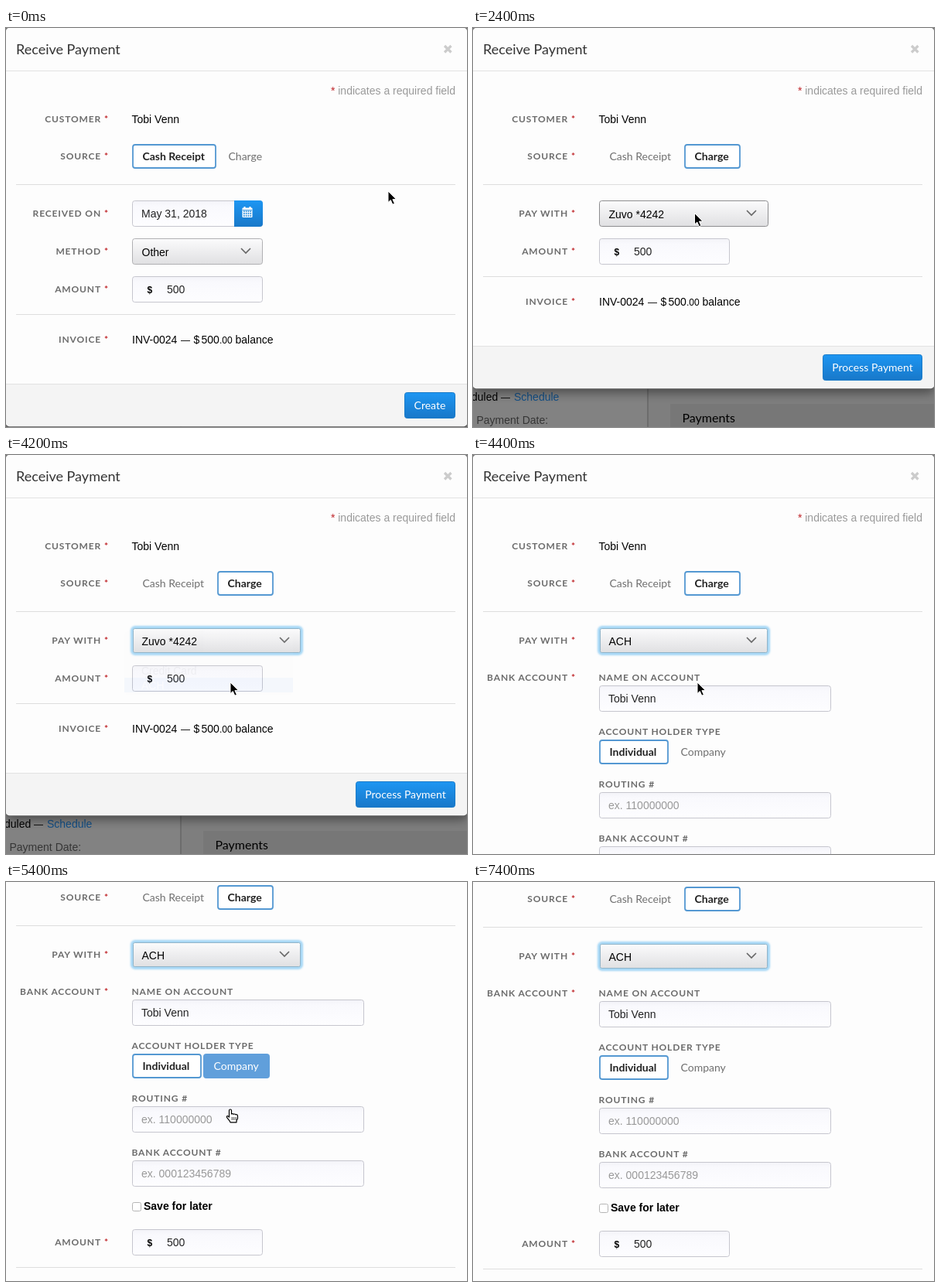
Animation, 596 px wide and 516 px high, one loop 7600 ms. Source, as an HTML page:

```html
<!DOCTYPE html>
<html lang="en">
<head>
<meta charset="utf-8">
<title>Receive Payment</title>
<style>
  html, body { margin: 0; width: 100%; height: 100%; overflow: hidden; background: #7e7e7e; }
  svg { display: block; }
  text { font: 14px "Liberation Sans", Arial, sans-serif; fill: #000; white-space: pre; }
  .lato { font-family: Lato, sans-serif; }
  .title { font: 18px Lato, sans-serif; fill: #333; }
  .label { font: bold 12px Lato, sans-serif; letter-spacing: .85px; fill: #6c6c6c; }
  .heading { font: 16px Lato, sans-serif; }
  .bold { font-weight: bold; }
  .small { font-size: 12px; }
  .value { fill: #222; }
  .muted { fill: #707070; }
  .hint { fill: #999; }
  .red { fill: #c0282c; }
  .white { fill: #fff; }
  .link { fill: #134f86; }
  .dim { fill: #363636; }
  .end { text-anchor: end; }
  .mid { text-anchor: middle; }
</style>
</head>
<body>
<svg width="596" height="516" viewBox="0 0 596 516">
  <defs>
    <linearGradient id="blue" x2="0" y2="1"><stop stop-color="#1d96f2"/><stop offset="1" stop-color="#1878c9"/></linearGradient>
    <linearGradient id="grey" x2="0" y2="1"><stop stop-color="#fbfbfc"/><stop offset="1" stop-color="#e0e0e2"/></linearGradient>
    <linearGradient id="field" x2="0" y2="1"><stop stop-color="#f3f3f8"/><stop offset=".2" stop-color="#f9f9fd"/><stop offset="1" stop-color="#fdfdff"/></linearGradient>
    <filter id="glow" x="-10%" y="-40%" width="120%" height="180%"><feGaussianBlur stdDeviation="1"/></filter>
    <filter id="shade" x="-10%" y="-10%" width="120%" height="120%"><feGaussianBlur stdDeviation="7"/></filter>
  </defs>
  <g id="scene"></g>
</svg>
<script>
const LOOP = 7600, STEP = 200;
const PERSON = 'Tobi Venn', CARD = 'Zuvo *4242';
const scene = document.getElementById('scene');

const text = (x, y, s, cls = '') => `<text x="${x}" y="${y}" class="${cls}">${s}</text>`;
const rect = (x, y, w, h, fill, more = '') =>
  `<rect x="${x}" y="${y}" width="${w}" height="${h}" fill="${fill}" ${more}/>`;
const path = (d, more) => `<path d="${d}" ${more}/>`;
const shift = (x, y, body) => `<g transform="translate(${x} ${y})">${body}</g>`;

// Controls are placed by the vertical centre of their row.
const box = (x, y, w, fill, stroke) =>
  rect(x + .5, y - 16.5, w - 1, 33, fill, `rx="3" stroke="${stroke}"`);
const divider = y => rect(13, y, 568, 1, '#dedede');
const label = (y, s) => text(123, y + 4, s, 'label end') + text(127, y + 4, '*', 'label red');
const caption = (y, s) => text(162.5, y + 4, s, 'label');
const input = (y, w, s, cls = 'value') => box(163, y, w, 'url(#field)', '#c6c6ce') + text(175, y + 5, s, cls);
const button = (x, y, w, s) =>
  rect(x + .5, y - 16.5, w - 1, 33, 'url(#blue)', 'rx="3" stroke="#1b7bc8"') +
  text(x + w / 2, y + 4.5, s, 'lato white mid');

function select(y, w, s, border, focused) {
  const x = 163 + w - 28;
  const halo = rect(163, y - 17, w, 34, 'none', 'rx="4" stroke="#a3d6f5" stroke-width="4" filter="url(#glow)"');
  const frame = focused
    ? halo + rect(164.5, y - 15.5, w - 3, 31, 'url(#grey)', 'rx="2" stroke="#8fb3c8"')
    : box(163, y, w, 'url(#grey)', border);
  return frame + text(175.5, y + 6, s) +
    path(`M${x} ${y - 4}l6 6 6-6`, 'fill="none" stroke="#666" stroke-width="1.6"');
}

const toggleText = { on: 'lato bold value', hover: 'lato white', off: 'lato muted' };
function toggle(x, y, w, s, mode) {
  const frame = mode === 'on' ? rect(x + 1, y - 15, w - 2, 30, '#fff', 'rx="3" stroke="#5498d2" stroke-width="1.8"')
    : mode === 'hover' ? rect(x, y - 16, w, 32, '#609fdb', 'rx="4"') : '';
  return frame + text(x + 13.5, y + 5, s, toggleText[mode]);
}

function calendar() {
  let holes = '';
  for (let i = 0; i < 12; i++) holes += rect(307 + i % 4 * 2.8, 236.5 + (i / 4 | 0) * 2.8, 1.7, 1.7, '#1b86da');
  return path('M295 223h33a4 4 0 0 1 4 4v26a4 4 0 0 1-4 4h-33z', 'fill="url(#blue)"') +
    rect(305.5, 232.5, 13, 12.5, '#fff', 'rx="1"') + rect(307.5, 231, 2, 3, '#fff') +
    rect(314.5, 231, 2, 3, '#fff') + rect(306, 235, 12, .8, '#1b86da') + holes;
}

const header = () =>
  text(13, 34, 'Receive Payment', 'title') +
  path('M567 23l8.5 8.5m0-8.5l-8.5 8.5', 'stroke="#ccc" stroke-width="3.2"') +
  rect(0, 55, 596, 1, '#e2e2e2') +
  text(420, 86, '*', 'red') + text(581, 86, 'indicates a required field', 'hint end') +
  label(118, 'CUSTOMER') + text(162.5, 123, PERSON) + label(166, 'SOURCE') + divider(202);

const footer = action =>
  label(289, 'AMOUNT') + input(289, 169, '') +
  text(182.5, 294, '$', 'bold small') + text(208, 294, '500', 'value') + divider(321) +
  label(354, 'INVOICE') + text(163, 359, 'INV-0024') + text(226, 359, '—', 'small') +
  text(242.5, 359, '$') + text(252.5, 359, '500') + text(276, 359, '.00', 'small') + text(296.5, 359, 'balance') +
  rect(0, 411, 596, 50, '#f4f4f4') + rect(0, 456, 596, 10, '#f4f4f4', 'rx="5"') +
  rect(0, 411, 596, 1, '#e2e2e2') + action;

const cashFields = () =>
  label(240, 'RECEIVED ON') + input(240, 169, 'May 31, 2018') + calendar() +
  label(289, 'METHOD') + select(289, 169, 'Other', '#b0b0b3');

const bankFields = hover =>
  label(288, 'BANK ACCOUNT') + caption(288, 'NAME ON ACCOUNT') + input(315, 300, PERSON) +
  caption(358, 'ACCOUNT HOLDER TYPE') +
  toggle(163, 384, 90, 'Individual', 'on') + toggle(255, 384, 86, 'Company', hover ? 'hover' : 'off') +
  caption(426, 'ROUTING #') + input(453, 300, 'ex. 110000000', 'hint') +
  caption(496, 'BANK ACCOUNT #') + input(523, 300, 'ex. 000123456789', 'hint') +
  rect(163.5, 560.5, 11, 11, '#fff', 'rx="2" stroke="#b5b5b5"') + text(178, 570, 'Save for later', 'bold');

const page = () =>
  rect(0, 0, 596, 516, '#7e7e7e') + rect(0, 0, 225, 516, '#828282') + rect(225, 0, 2, 516, '#6c6c6c') +
  rect(255, 486, 341, 30, '#777') +
  text(-2, 482, 'duled') + text(36, 482, '—', 'small') + text(53, 482, 'Schedule', 'link') +
  text(4.5, 512, 'Payment Date:', 'dim') + text(270.5, 510, 'Payments', 'heading');

function menu(opacity, pointerY) {
  const active = pointerY < 262 ? 240 : pointerY < 288 ? 278 : 297;
  const item = (y, s) => (y === active ? rect(153, y - 9, 218, 19, '#3f86f4') : '') +
    text(175, y + 6, s, y === active ? 'white' : '');
  return `<g opacity="${opacity}">` +
    rect(153, 227, 218, 84, '#f6f6f6', 'rx="5"') + rect(153, 258.5, 218, 1, '#ddd') +
    item(240, CARD) + item(278, 'Credit Card') + item(297, 'ACH') + '</g>';
}

const arrow = path('M0 0v14.5l3.3-3 2.5 5.7 2.6-1.1-2.5-5.5h4.6z',
  'fill="#000" stroke="#fff" stroke-width="1" stroke-linejoin="round"');
const hand = path('M-1.5 8V1.5a1.5 1.5 0 0 1 3 0V6q1.3-1 2.7.3 1.5-.8 2.7.5 2.6-.5 2.6 2v3l-1.5 3v2H0l-1-2-3.5-4.5q-.5-2 1.3-1.7l1.7 1.5z',
  'fill="#fff" stroke="#000" stroke-width="1.2" stroke-linejoin="round"') +
  path('M2.3 10v4m2.4-4v4m2.4-4v4', 'stroke="#000" stroke-width=".8"');

// Eased interpolation between [time, ...values] keys.
function track(keys, t) {
  const next = keys.findIndex(k => k[0] > t);
  if (next < 0) return keys[keys.length - 1].slice(1);
  if (next === 0) return keys[0].slice(1);
  const a = keys[next - 1], b = keys[next];
  const u = (t - a[0]) / (b[0] - a[0]), e = u * u * (3 - 2 * u);
  return a.slice(1).map((v, j) => v + (b[j + 1] - v) * e);
}

const pointerKeys = [[0, 494, 211], [200, 494, 211], [1200, 304, 168], [1800, 304, 168], [2400, 286.5, 239.5],
  [2800, 286.5, 239.5], [3600, 290, 294], [6200, 290, 294], [7200, -8, -14]];
const scrollKeys = [[4600, 0], [4800, 29], [5000, 85], [5200, 130], [5400, 146], [5600, 146], [5800, 144]];

function draw(t) {
  const form = t < 1800 ? 'cash' : t < 4400 ? 'card' : 'bank';
  const cash = form === 'cash', bank = form === 'bank';
  const offset = { cash: 49, card: 0, bank: 323 }[form];
  const [x, y] = track(pointerKeys, t);
  const [scroll] = track(scrollKeys, t);
  const hoverCharge = t >= 1200 && t < 1800, hoverCompany = t >= 5000 && t < 5600;

  const source = toggle(163, 166, 109, 'Cash Receipt', cash ? 'on' : 'off') + (cash
    ? toggle(274, 166, 73, 'Charge', hoverCharge ? 'hover' : 'off')
    : toggle(273, 166, 73, 'Charge', 'on'));
  const fields = cash ? cashFields()
    : label(240, 'PAY WITH') + select(240, 219, bank ? 'ACH' : CARD, '#8d8d8f', t >= 2800) +
      (bank ? bankFields(hoverCompany) : '');
  const action = cash ? button(515, 439, 66, 'Create') : button(452, 439, 129, 'Process Payment');
  const height = 466 + offset;
  const modal = rect(0, 5, 596, height, '#000', 'rx="5" opacity=".45" filter="url(#shade)"') +
    rect(-.5, -.5, 597, height + 1, '#fdfdfd', 'rx="5" stroke="#000" stroke-opacity=".25"') +
    header() + source + fields + shift(0, offset, footer(action));

  const popup = t >= 2800 && t < 4400 ? menu(t < 4200 ? 1 : .04, y) : '';
  const pointer = hoverCharge || hoverCompany ? hand : arrow;
  scene.innerHTML = page() + shift(0, -scroll, modal) + popup + shift(x, y, pointer);
}

let shown = -1;
function tick() {
  const step = Math.floor(performance.now() % LOOP / STEP);
  if (step !== shown) draw((shown = step) * STEP);
  requestAnimationFrame(tick);
}
tick();
</script>
</body>
</html>
```
